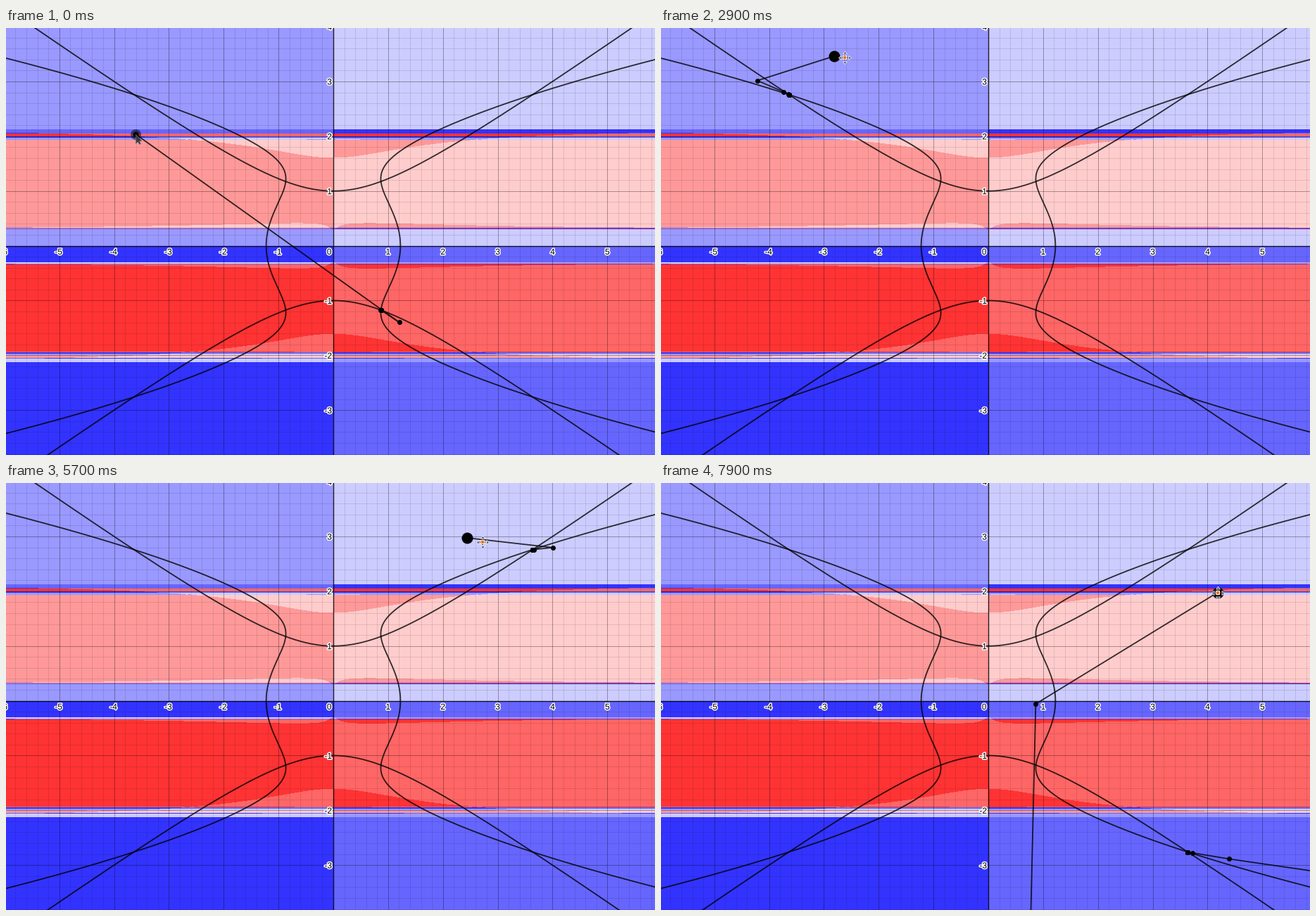
A matplotlib script for the animation above (8 s loop, 922 by 607 pixels).

```python
import numpy as np
import matplotlib.pyplot as plt
from matplotlib.animation import FuncAnimation
from matplotlib.patheffects import withStroke
from matplotlib.path import Path

W, H = 922, 607
DPI = 64
PT = 72 / DPI                      # points per pixel
X0, Y0, UNIT = 465, 309.6, 77.87   # origin and unit length in pixels
FRAMES, STEP = 80, 100

# Drag path: frame, x, y in pixels
DRAG = np.array([
    (0, 184, 150.85), (3, 184, 150.85), (4, 182, 142.5), (8, 166, 132),
    (11, 150, 122), (13, 139, 110), (14, 118, 91), (15, 96, 79),
    (17, 78, 64), (20, 80, 51), (22, 112, 44), (24, 162, 39),
    (28, 162, 39), (29, 246, 40), (37, 369, 54), (38, 388, 55),
    (39, 431, 55), (41, 460, 56), (46, 501, 57.5), (47, 509, 58),
    (48, 521, 60.5), (51, 559, 63), (52, 559, 63), (57, 655, 78),
    (61, 744, 101), (63, 766, 119), (65, 777, 132), (68, 782, 139.9),
    (70, 783, 141.9), (71, 784, 146), (79, 791, 155.5)])
PAUSES = (28, 52)


def to_px(x, y):
    return X0 + UNIT * np.asarray(x), Y0 - UNIT * np.asarray(y)


def to_math(px, py):
    return (px - X0) / UNIT, (Y0 - py) / UNIT


def newton(x, y):
    """One step for x^2 - 2y^2 + 2 = 0 and x^2 + y^2 - y^4/3 - 3/2 = 0."""
    u = y * y
    dy = -(u * u / 3 - 3 * u + 3.5) / (4 * y * u / 3 - 6 * y)
    return x / 2 + (u + 2 * y * dy - 1) / x, y + dy


def basins():
    x, y = to_math(np.arange(W)[None, :] + 0.5, np.arange(H)[:, None] + 0.5)
    x = np.repeat(x, H, axis=0)
    with np.errstate(all="ignore"):
        for _ in range(45):
            x, y = newton(x, y)
    y = np.broadcast_to(y, x.shape)
    tint = 51 + 51 * (x > 0) + 102 * (y > 0)
    outer = np.abs(y) > 2
    return np.dstack([np.where(outer, tint, 255), tint,
                      np.where(outer, 255, tint)]).astype(np.uint8)


def position(i):
    return tuple(np.interp(i, DRAG[:, 0], DRAG[:, k]) for k in (1, 2))


def orbit(px, py, steps=25):
    pts = [to_math(px, py)]
    for _ in range(steps):
        pts.append(newton(*pts[-1]))
    return to_px(*np.array(pts).T)


def polygons(*shapes):
    verts, codes = [], []
    for s in shapes:
        verts += list(s) + [s[0]]
        codes += [Path.MOVETO] + [Path.LINETO] * (len(s) - 1) + [Path.CLOSEPOLY]
    return Path(verts, codes)


fig = plt.figure(figsize=(W / DPI, H / DPI), dpi=DPI)
ax = fig.add_axes([0, 0, 1, 1])
ax.imshow(basins(), extent=(0, W, H, 0), interpolation="nearest", aspect="auto")
ax.set_xlim(0, W)
ax.set_ylim(H, 0)
ax.axis("off")

# Grid
for k in range(-30, 31):
    if k == 0:
        alpha, width = 0.85, 1.4
    else:
        alpha, width = (0.1, 1) if k % 5 else (0.32, 1)
    style = dict(color="black", alpha=alpha, lw=width * PT, zorder=2)
    gx, gy = to_px(k / 5, k / 5)
    ax.axvline(gx, **style)
    ax.axhline(gy, **style)

# Curves
LINE = dict(color="black", alpha=0.8, lw=1.8 * PT)
t = np.linspace(-6.2, 6.2, 800)
branch_y = np.sqrt(1 + t * t / 2)
branch_x = np.sqrt(1.5 - t ** 2 + t ** 4 / 3)
for sign in (1, -1):
    ax.plot(*to_px(t, sign * branch_y), zorder=3, **LINE)
    ax.plot(*to_px(sign * branch_x, t), zorder=3, **LINE)


def label(px, py, text, ha):
    ax.text(px, py, text, ha=ha, va="center_baseline", fontsize=12 * PT,
            family="Liberation Sans", color="black", zorder=4, clip_on=True,
            path_effects=[withStroke(linewidth=3 * PT, foreground="white")])


for k in range(-6, 6):
    gx, gy = to_px(k, k)
    if k == 0:
        label(462.5, 317.5, "0", "right")
        continue
    label(gx - (k < 0), 317.5, str(k), "center")
    if -4 <= k <= 4:
        label(463, gy, str(k), "right")


def marker(shape, size, color, z, **kw):
    return ax.plot([], [], linestyle="", marker=shape, ms=size * PT, color=color,
                   zorder=z, **{"mew": 0, **kw})[0]


path, = ax.plot([], [], zorder=5, solid_joinstyle="round", **LINE)
dots = marker("o", 7, "black", 6)
halo = marker("o", 15, "black", 6, alpha=0.5)
knob = marker("o", 16, "black", 7)

heads = [[(r * np.cos(a), r * np.sin(a)) for r, a in
          ((9, q), (6.2, q + 0.5), (6.2, q - 0.5))] for q in np.arange(4) * np.pi / 2]
spots = [[(c * x + s, c * y + d) for s, d in ((-.7, -.7), (.7, -.7), (.7, .7), (-.7, .7))]
         for c in (3.6,) for x, y in ((1, 0), (0, 1), (-1, 0), (0, -1))]
move = [marker(polygons(*heads), 18, "#45454d", 8, mec="#f4f4ff", mew=0.8 * PT),
        marker(polygons(*spots), 8.6, "#55555c", 8),
        marker("s", 5.5, "#fff0e4", 8),
        marker("s", 3.6, "#e8752f", 9)]
arrow = marker(polygons([(0, 0), (0, -13), (3, -10.3), (5, -14), (7, -13),
                         (5.2, -9.4), (8.6, -9)]),
               28, "#3c3c3c", 9, mec="#77778a", mew=0.5 * PT)


def update(i):
    x, y = position(i)
    held = i >= 3
    ox, oy = orbit(x, y)
    path.set_data(ox, oy)
    dots.set_data(ox[1:], oy[1:])
    halo.set_data([x], [y])
    halo.set_visible(not held)
    knob.set_data([x], [y])
    knob.set_markersize((16 if held else 8) * PT)
    arrow.set_data([x], [y])
    arrow.set_visible(not held)
    # the pointer runs one step ahead of the dragged point
    cx, cy = position(i if i in PAUSES else i + 1)
    for part in move:
        part.set_data([cx], [cy + 0.7])
        part.set_visible(held)
    return [path, dots, halo, knob, arrow, *move]


anim = FuncAnimation(fig, update, frames=FRAMES, interval=STEP,
                     repeat=True, repeat_delay=0, blit=False)
plt.show()
```
